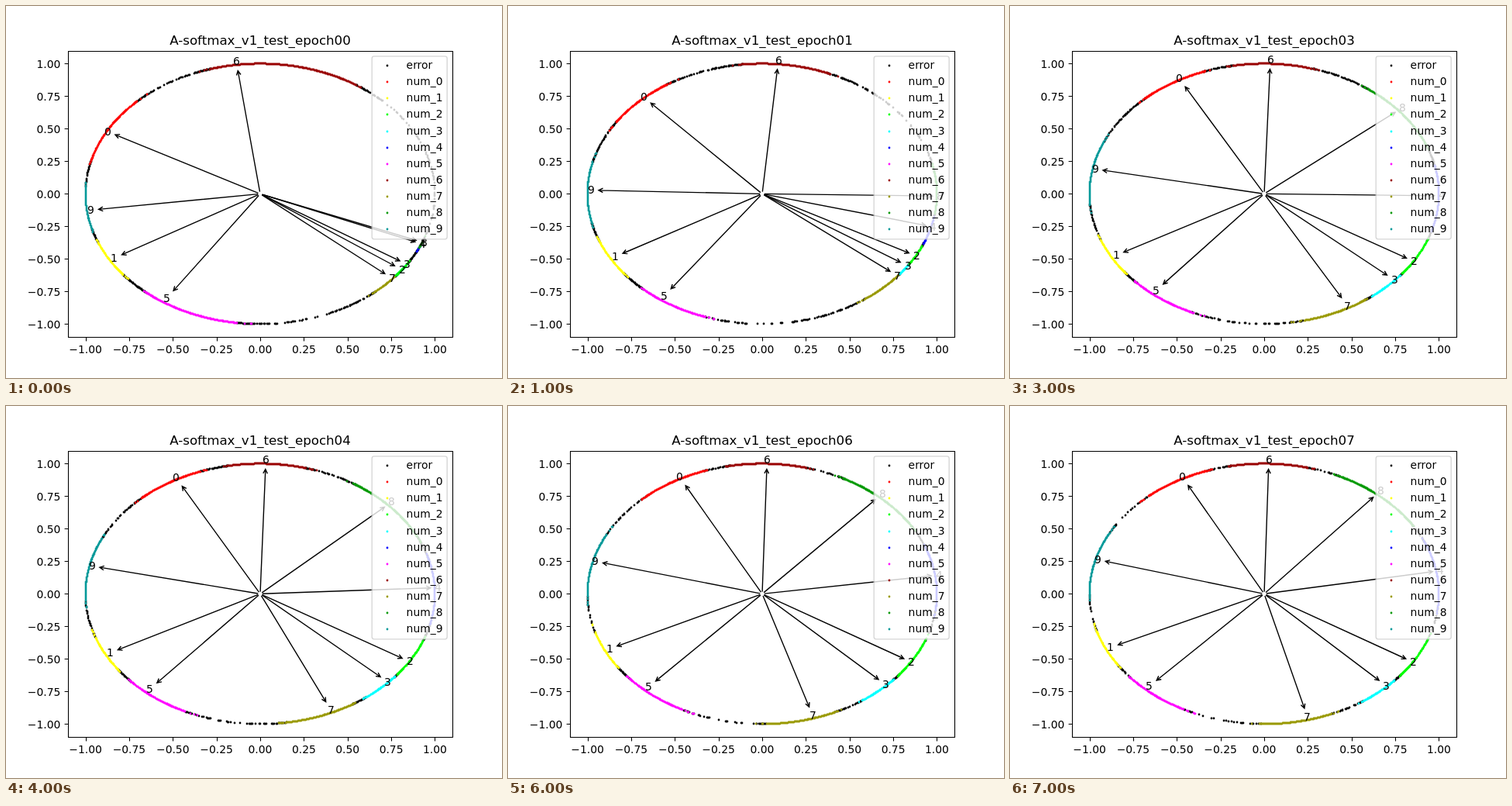
Animation of 640x480 px, one loop 8000 ms. Source, as an HTML page:

```html
<!DOCTYPE html>
<html lang="en">
<head>
<meta charset="utf-8">
<title>Softmax embedding by epoch</title>
<style>
  html, body { margin: 0; width: 100%; height: 100%; overflow: hidden; background: #fff; }
  svg { display: block; width: 640px; height: 480px; font: 13.89px "DejaVu Sans", sans-serif; }
  .title { font-size: 16.67px; }
  .dots { fill: none; stroke-width: 2.78; stroke-linecap: round; }
  .arrow { fill: none; stroke: #000; stroke-width: 1.39; }
  .axis { fill: none; stroke: #000; stroke-width: 1.1; }
</style>
</head>
<body>
<svg id="stage" viewBox="0 0 640 480"></svg>
<script>
const EPOCH_MS = 1000, EPOCHS = 8;
const CX = 328, CY = 242.4, RX = 225.45, RY = 168;

const COLORS = ['#ff0000', '#ffff00', '#00ff00', '#00ffff', '#0000ff',
                '#ff00ff', '#990000', '#999900', '#009900', '#009999'];

// Classes in order around the circle. `path` holds the centre angle at the key
// epochs, `reach` the spread below and above it, `early` the spread at the start.
const KEYS = [0, 1, 3, 7];
const CLASSES = [
  { id: 6, path: [99, 85.8, 89.1, 89.6], reach: [14, 11], early: [42, 7] },
  { id: 0, path: [153.2, 134.3, 120.5, 119.3], reach: [10, 12], early: [18, 12] },
  { id: 9, path: [188.7, 179.9, 170.6, 166.4], reach: [14, 14], early: [12, 7] },
  { id: 1, path: [211.3, 210.6, 209.9, 206], reach: [9, 7] },
  { id: 5, path: [236.2, 234.4, 230.3, 227.4], reach: [7, 15], early: [7, 26] },
  { id: 7, path: [317.4, 319, 297.3, 283.2], reach: [14, 9], early: [6, 3] },
  { id: 3, path: [325.3, 324.5, 316.5, 312.8], reach: [8, 5] },
  { id: 2, path: [322.4, 329.7, 326.9, 326.5], reach: [5, 12] },
  { id: 4, path: [335.6, 343.7, 357.6, 368.7], reach: [14, 14], early: [1, 1] },
  { id: 8, path: [336.4, 357.5, 399.4, 409.8], reach: [17, 14], early: [1, 1] }
];

const SVG_NS = 'http://www.w3.org/2000/svg';
const stage = document.getElementById('stage');

function add(parent, tag, attrs, text) {
  const el = document.createElementNS(SVG_NS, tag);
  for (const k in attrs) el.setAttribute(k, attrs[k]);
  if (text !== undefined) el.textContent = text;
  return parent.appendChild(el);
}

function seeded(s) {
  return () => {
    s = (s * 1664525 + 1013904223) >>> 0;
    return s / 4294967296;
  };
}

const mix = (a, b, u) => a + (b - a) * u;
const easeOut = u => u * (1.4 - 0.4 * u);

function centerAt(path, e) {
  const k = Math.max(1, KEYS.findIndex(key => key >= e));
  return mix(path[k - 1], path[k], easeOut((e - KEYS[k - 1]) / (KEYS[k] - KEYS[k - 1])));
}

// Each class spreads by its reach, but not much beyond half way to a neighbour.
function arcsAt(e) {
  const centers = CLASSES.map(c => centerAt(c.path, e));
  const n = centers.length;
  const settle = 1 - Math.exp(-2 * e);
  return CLASSES.map(({ id, reach, early = reach }, i) => {
    const mid = centers[i];
    const before = i ? centers[i - 1] : centers[n - 1] - 360;
    const after = i < n - 1 ? centers[i + 1] : centers[0] + 360;
    const span = (side, room) =>
      Math.min(mix(early[side], reach[side], settle), Math.max(1.5, 0.42 * room));
    return { id, mid, lo: mid - span(0, mid - before), hi: mid + span(1, after - mid) };
  });
}

function onCircle(deg) {
  const a = deg * Math.PI / 180;
  return [CX + RX * Math.cos(a), CY - RY * Math.sin(a)];
}
const pt = p => p.map(v => v.toFixed(2)).join(' ');
// Scatter markers sit on whole pixels.
const dot = deg => `M${onCircle(deg).map(Math.round).join(' ')}h0`;

function drawDots(g, arcs, e) {
  const rnd = seeded(97 + e * 31);
  const n = arcs.length;
  const gaps = arcs.map((a, i) => (i < n - 1 ? arcs[i + 1].lo : arcs[0].lo + 360) - a.hi);

  // Errors get fewer by epoch and crowd towards the classes.
  const count = 120 * Math.exp(-0.2 * e);
  let errors = '';
  arcs.forEach((a, i) => {
    for (let k = 0; k < count && gaps[i] > 0; k++) {
      const u = rnd();
      errors += dot(a.hi + gaps[i] * (u - 0.08 * Math.sin(2 * Math.PI * u)));
    }
  });
  add(g, 'path', { class: 'dots', stroke: '#000', d: errors });

  arcs.forEach(({ id, lo, hi }, i) => {
    let d = '';
    for (let a = lo; a <= hi; a += 0.2) d += dot(a);
    const tail = (edge, dir, gap) => {
      const len = Math.max(0, Math.min(5, gap / 4));
      for (let k = 0; k < 6; k++) d += dot(edge + dir * len * rnd() ** 2);
    };
    tail(lo, -1, gaps[(i + n - 1) % n]);
    tail(hi, 1, gaps[i]);
    add(g, 'path', { class: 'dots', stroke: COLORS[id], d });
  });
}

function drawArrow(g, digit, deg) {
  const [x, y] = onCircle(deg);
  const tx = x + 4.4, ty = y - 4.5;
  const len = Math.hypot(CX - tx, CY - ty);
  const ux = (CX - tx) / len, uy = (CY - ty) / len;
  // The tip stops at the padded box of the label.
  const gap = Math.min(7.2 / Math.abs(ux), 8.8 / Math.abs(uy)) + 2.78;
  const tip = [tx + ux * gap, ty + uy * gap];
  const barb = s => [tip[0] + ux * 5.56 - s * uy * 2.78, tip[1] + uy * 5.56 + s * ux * 2.78];
  const tail = [CX - ux * 2.78, CY - uy * 2.78];
  add(g, 'path', {
    class: 'arrow',
    d: `M${pt(tail)}L${pt(tip)}M${pt(barb(1))}L${pt(tip)}L${pt(barb(-1))}`
  });
  add(g, 'text', { x: Math.round(x), y: Math.round(y) }, digit);
}

function drawLegend(g) {
  add(g, 'rect', {
    x: 472.2, y: 64.9, width: 97, height: 236, rx: 2.78,
    fill: '#fff', stroke: '#ccc', 'stroke-width': 1.39, opacity: 0.8
  });
  ['error', ...COLORS.keys()].forEach((key, i) => {
    const y = Math.round(77.2 + i * 21.08);
    add(g, 'path', { class: 'dots', stroke: i ? COLORS[key] : '#000', d: `M492 ${y}h0` });
    add(g, 'text', { x: 516.6, y: y + 4 }, i ? 'num_' + key : key);
  });
}

function drawAxes() {
  const snap = v => Math.floor(v + 0.5) + 0.5;
  let d = 'M80.5 58.5H576.5V427.5H80.5Z';
  for (let i = -4; i <= 4; i++) {
    const v = i / 4, x = CX + RX * v, y = CY - RY * v;
    const label = (v < 0 ? '\u2212' : '') + Math.abs(v).toFixed(2);
    d += `M${snap(x)} 427.5v4.9M80.5 ${snap(y)}h-4.9`;
    add(stage, 'text', { x, y: 448, 'text-anchor': 'middle' }, label);
    add(stage, 'text', { x: 70.3, y: Math.round(y + 5.2), 'text-anchor': 'end' }, label);
  }
  add(stage, 'path', { class: 'axis', d });
}

drawAxes();
const views = Array.from({ length: EPOCHS }, (_, e) => {
  const g = add(stage, 'g', { visibility: 'hidden' });
  const arcs = arcsAt(e);
  add(g, 'text', { class: 'title', x: CX, y: 50, 'text-anchor': 'middle' }, 'A-softmax_v1_test_epoch0' + e);
  drawDots(g, arcs, e);
  for (const { id, mid } of arcs) drawArrow(g, id, mid);
  drawLegend(g);
  return g;
});

let shown = -1;
const start = performance.now();
function tick() {
  const e = Math.floor((performance.now() - start) / EPOCH_MS) % EPOCHS;
  if (e !== shown) {
    views.forEach((g, i) => g.setAttribute('visibility', i === e ? 'visible' : 'hidden'));
    shown = e;
  }
  requestAnimationFrame(tick);
}
tick();
</script>
</body>
</html>
```
